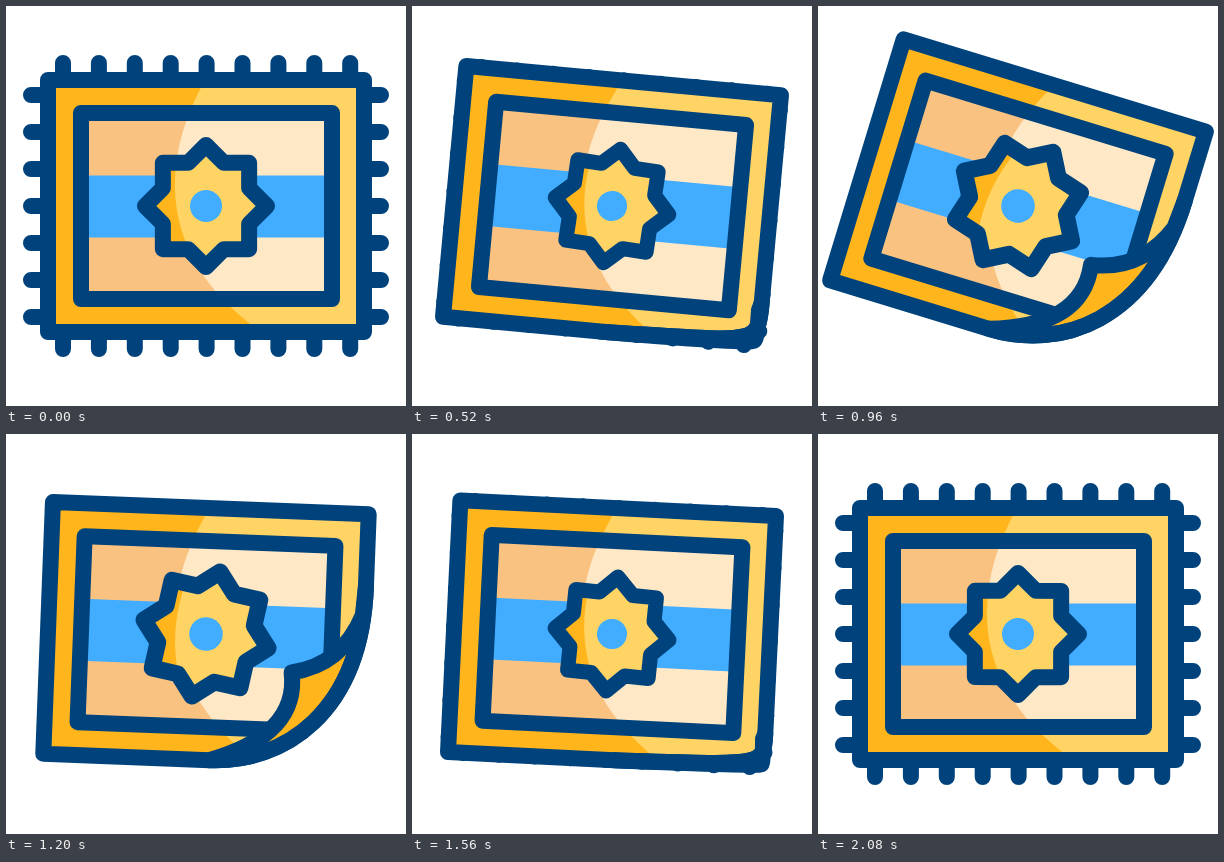
An HTML page that plays this animation: 400 px wide and 400 px high, repeating every 2.2 s.

```html
<!DOCTYPE html>
<html lang="en">
<head>
<meta charset="utf-8">
<title>Carpet</title>
<style>
  html, body { margin: 0; width: 100%; height: 100%; overflow: hidden; background: #fff; }
  svg { display: block; width: 100vw; height: 100vh; }
  .line { fill: none; stroke: #00437c; stroke-width: 16; stroke-linecap: round; stroke-linejoin: round; }
  .gold { fill: #ffb51b; }
  .yellow { fill: #ffd464; }
  .peach { fill: #fac280; }
  .cream { fill: #ffe8c5; }
  .blue { fill: #42adff; }
</style>
</head>
<body>
<svg viewBox="0 0 400 400">
  <defs>
    <clipPath id="sheetClip"><path id="sheetShape"/></clipPath>
    <clipPath id="lightClip"><path d="M199 74C148 165 158 260 258 328H400V74Z"/></clipPath>
    <path id="starShape"/>
  </defs>
  <g id="carpet">
    <path id="fringe" class="line"/>
    <g clip-path="url(#sheetClip)">
      <path class="gold" d="M42 74H358V326H42Z"/>
      <path class="yellow" clip-path="url(#lightClip)" d="M42 74H358V326H42Z"/>
      <path class="peach" d="M75 107H326V293H75Z"/>
      <path class="cream" clip-path="url(#lightClip)" d="M75 107H326V293H75Z"/>
      <path class="blue" d="M75 169.5H326V231.5H75Z"/>
      <path class="line" d="M75 107H326V293H75Z"/>
      <g id="star">
        <use href="#starShape" class="gold"/>
        <g clip-path="url(#lightClip)"><use href="#starShape" class="yellow"/></g>
        <use href="#starShape" class="line"/>
        <circle class="blue" cx="200" cy="200" r="16"/>
      </g>
    </g>
    <path id="flap" class="line" style="fill:#ffb51b"/>
    <path id="edge" class="line"/>
  </g>
</svg>
<script>
const LOOP = 2200, STEP = 40, LAST = 2080;
const byId = id => document.getElementById(id);
const set = (id, name, value) => byId(id).setAttribute(name, value);

// Sine ease from 0 at time a to 1 at time b.
function ramp(t, a, b) {
  const u = Math.min(1, Math.max(0, (t - a) / (b - a)));
  return (1 - Math.cos(Math.PI * u)) / 2;
}

// One slow tilt, then swings back and forth, each smaller by the same ratio.
function swing(t) {
  const ratio = -.46;
  let pose = 17.2, angle = pose * ramp(t, 220, 1020);
  let from = 1020, to = 1340;
  for (let n = 0; n < 5; n++) {
    const next = n < 4 ? pose * ratio : 0;
    angle += (next - pose) * ramp(t, from, to);
    pose = next;
    from = to;
    to += 175;
  }
  return angle;
}

const tassel = t => 1 - ramp(t, 40, 560) + ramp(t, 1540, 1880);
const peel = t => ramp(t, 480, 740) - ramp(t, 1270, 1600);
const starSize = t => 1 - .06 * ramp(t, 0, 480) + .13 * ramp(t, 480, 1120)
  - .17 * ramp(t, 1120, 1440) + .1 * ramp(t, 1440, 1720);

function fringePath(k) {
  const len = 17 * k;
  let d = '';
  for (let i = 0; i < 9; i++) {
    const x = 57 + i * 35.9;
    d += `M${x} 74v${-len}M${x} 326v${len}`;
  }
  for (let i = 0; i < 7; i++) {
    const y = 89 + i * 37;
    d += `M42 ${y}h${-len}M358 ${y}h${len}`;
  }
  return d;
}

function starPath() {
  const points = [];
  for (let i = 0; i < 16; i++) {
    const r = i % 2 ? 46.7 : 61, a = i * Math.PI / 8;
    points.push(`${200 + r * Math.cos(a)} ${200 + r * Math.sin(a)}`);
  }
  return `M${points.join('L')}Z`;
}

// Outer curve of the curled corner and the flap folded over it.
function peelPaths(p) {
  if (p < .001) return { sheet: 'M42 74H358V326H42Z', flap: '' };
  const root = Math.sqrt(p), lift = 80 * p * (1 - p);
  const top = 326 - 180 * root, end = 208;
  const curve = `C358 ${326 - 52 * p * p} ${358 - 76 * p * p} ${326 - lift} ${end} 326`;
  const x = 358 - 71 * p, y = 326 - 91 * p;
  return {
    sheet: `M42 74H358V${top}${curve}H42Z`,
    flap: `M358 ${top}${curve}Q${x + 10 * p} ${y + 62 * p} ${x} ${y}`
        + `Q${x + 50 * p} ${y - 9 * p} 356 ${326 - 151 * root}Z`
  };
}

function draw(t) {
  const k = tassel(t), { sheet, flap } = peelPaths(peel(t));
  set('carpet', 'transform', `rotate(${swing(t)} 200 200)`);
  set('fringe', 'd', k > .001 ? fringePath(k) : '');
  set('sheetShape', 'd', sheet);
  set('edge', 'd', sheet);
  set('flap', 'd', flap);
  // The star trails the carpet's swing.
  set('star', 'transform',
    `translate(200 200) rotate(${swing(t - 70)}) scale(${starSize(t)}) translate(-200 -200)`);
}

set('starShape', 'd', starPath());
const start = performance.now();
function tick() {
  const t = (performance.now() - start) % LOOP;
  draw(Math.min(Math.floor(t / STEP) * STEP, LAST));
  requestAnimationFrame(tick);
}
tick();
</script>
</body>
</html>
```
